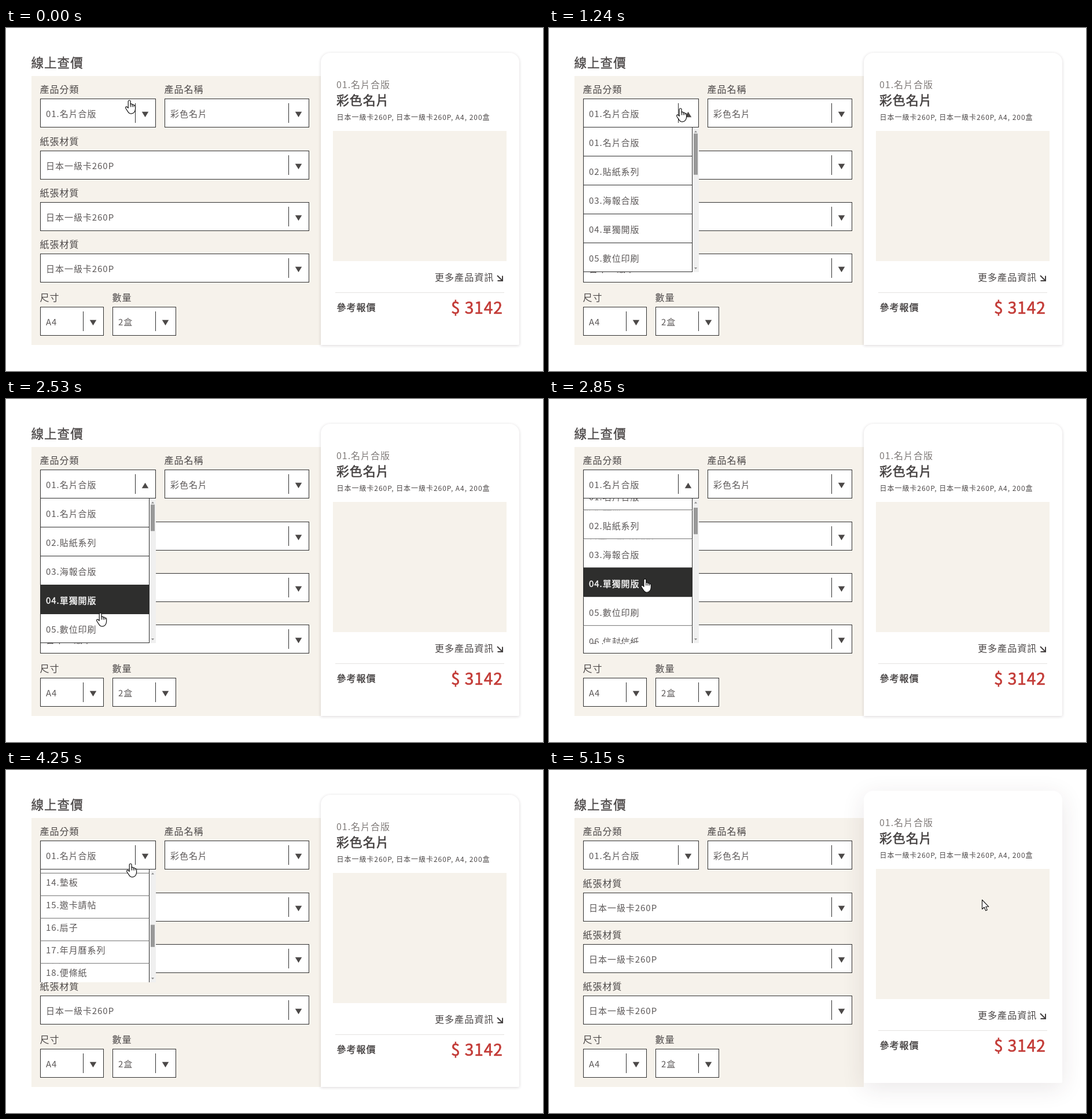
An HTML page with a canvas for the animation above (5.29 s loop, 928x593 px).

```html
<!DOCTYPE html>
<html lang="zh-Hant">
<head>
<meta charset="utf-8">
<title>線上查價</title>
<style>
html, body { margin: 0; width: 100%; height: 100%; overflow: hidden; background: #fff; }
canvas { display: block; }
</style>
</head>
<body>
<canvas id="stage" width="928" height="593"></canvas>
<script>
const ctx = document.getElementById('stage').getContext('2d');
const LOOP = 5290, OPEN = 480, CLOSE = 4160;
const FONT = '"Noto Sans CJK TC", "Noto Sans CJK JP", "Noto Sans CJK", sans-serif';
const INK = '#2f2f2f', TEXT = '#4c4848', SOFT = '#5c5858', BEIGE = '#f6f2eb';
const LIST = { x: 59, y: 172, w: 189, bar: 11, row: 50, max: 250 };

const items = ('名片合版 貼紙系列 海報合版 單獨開版 數位印刷 信封信紙 摺頁傳單 書籍手冊 聯單表單 紙袋提袋 ' +
  '資料夾 卡牌、桌遊 明信片 墊板 邀卡請帖 扇子 年月曆系列 便條紙 紙盒 酷卡 帆布海報 杯墊 吊牌 獎狀 其他')
  .split(' ').map((name, i) => String(i + 1).padStart(2, '0') + '.' + name);

const selects = [
  { x: 59, y: 122, w: 200, text: items[0] },
  { x: 274, y: 122, w: 250, text: '彩色名片' },
  ...[212, 301, 390].map(y => ({ x: 59, y, w: 465, text: '日本一級卡260P' })),
  { x: 59, y: 482, w: 110, text: 'A4' },
  { x: 184, y: 482, w: 110, text: '2盒' }
];

// Pointer stops: time, x, y
const path = [
  [0, 213, 125], [280, 227, 139], [1530, 227, 139], [2060, 164, 312], [2120, 164, 318],
  [2530, 163, 370], [2640, 163, 370], [2900, 166, 305], [3760, 166, 305],
  [4200, 215, 162], [4330, 215, 162], [5130, 748, 224], [LOOP, 748, 224]
];

const clamp = v => Math.min(1, Math.max(0, v));
const ease = v => { v = clamp(v); return v * v * (3 - 2 * v); };
const mix = (a, b, k) => a + (b - a) * k;

function pointer(t) {
  let n = 1;
  while (n < path.length - 1 && t >= path[n][0]) n++;
  const [t0, x0, y0] = path[n - 1], [t1, x1, y1] = path[n];
  const k = ease((t - t0) / (t1 - t0));
  return { x: mix(x0, x1, k), y: mix(y0, y1, k) };
}

function rowHeight(i, t) {
  return LIST.row * (t < CLOSE ? ease((t - 530 - 36 * i) / 300) : 1 - ease((t - CLOSE) / 300));
}

const scrollAt = t => 500 * ease((t - 2780) / 480);

function hoveredRow(t) {
  if (t < 1000 || t >= CLOSE || (t > 2860 && t < 3790)) return -1;
  const p = pointer(t);
  if (p.y < LIST.y || p.x > LIST.x + LIST.w) return -1;
  return Math.floor((p.y - LIST.y + scrollAt(t)) / LIST.row);
}

// Share of the last 160 ms that the pointer spent on a row
function hoverAmount(i, t) {
  let hits = 0;
  for (let k = 0; k < 16; k++) if (hoveredRow(t - k * 10) === i) hits++;
  return hits / 16;
}

function rect(x, y, w, h, color) {
  ctx.fillStyle = color;
  ctx.fillRect(x, y, w, h);
}

// Text centred vertically on y; "heavy" thickens the strokes
function label(str, x, y, size, color = TEXT, heavy = 0, align = 'left') {
  ctx.font = `400 ${size}px ${FONT}`;
  ctx.letterSpacing = '0.96px';
  ctx.textAlign = align;
  ctx.fillStyle = ctx.strokeStyle = color;
  const base = y + size * 0.38;
  ctx.fillText(str, x, base);
  if (heavy) {
    ctx.lineWidth = heavy;
    ctx.lineJoin = 'round';
    ctx.strokeText(str, x, base);
  }
}

function poly(points, x, y, fill, stroke) {
  ctx.beginPath();
  points.forEach(([px, py]) => ctx.lineTo(x + px, y + py));
  ctx.closePath();
  ctx.fillStyle = fill;
  ctx.fill();
  if (stroke) {
    ctx.strokeStyle = stroke;
    ctx.lineWidth = 1.1;
    ctx.lineJoin = 'round';
    ctx.stroke();
  }
}

function triangle(x, y, w, h, up, color) {
  const d = up ? -1 : 1;
  poly([[-w / 2, -d * h / 2], [w / 2, -d * h / 2], [0, d * h / 2]], x, y, color);
}

function drawSelect({ x, y, w, text }, up) {
  rect(x, y, w, 50, INK);
  rect(x + 1, y + 1, w - 2, 48, '#fff');
  rect(x + w - 36, y + 8, 1, 34, INK);
  triangle(x + w - 18.5, y + 27.5, 11.5, 9.5, up, '#4c4948');
  label(text, x + 10, y + 26.5, 15, SOFT);
}

function drawForm(t) {
  label('線上查價', 43.5, 60, 21.6, TEXT, 0.35);
  rect(44, 83, 500, 465, BEIGE);
  label('產品分類', 58.5, 105.5, 16);
  label('產品名稱', 273.5, 105.5, 16);
  for (const y of [195.5, 284.5, 373.5]) label('紙張材質', 58.5, y, 16);
  label('尺寸', 58.5, 466, 16);
  label('數量', 183.5, 466, 16);
  selects.forEach((s, i) => drawSelect(s, i === 0 && t >= OPEN && t < CLOSE));
}

function drawCard(t) {
  const k = ease((t - 4680) / 420);
  ctx.save();
  ctx.translate(0, -7 * k);
  ctx.shadowColor = `rgba(60,40,50,${mix(0.2, 0.11, k)})`;
  ctx.shadowBlur = mix(5, 40, k);
  ctx.shadowOffsetY = mix(1, 9, k);
  ctx.fillStyle = '#fff';
  ctx.beginPath();
  ctx.roundRect(544, 43, 343, 505, [16, 16, 2, 0]);
  ctx.fill();
  ctx.shadowColor = 'transparent';
  label(items[0], 571, 97.5, 16, '#7f7a78');
  label('彩色名片', 571, 125, 21.9, '#444040', 0.6);
  label('日本一級卡260P, 日本一級卡260P, A4, 200盒', 571.5, 154.5, 12, TEXT);
  rect(565, 178, 300, 225, BEIGE);
  label('更多產品資訊', 741, 431, 16.1);
  ctx.strokeStyle = '#454141';
  ctx.lineWidth = 2;
  ctx.lineJoin = 'miter';
  ctx.beginPath();
  ctx.moveTo(849, 428);
  ctx.lineTo(857.5, 436.5);
  ctx.moveTo(858, 428.5);
  ctx.lineTo(858, 437);
  ctx.lineTo(849.5, 437);
  ctx.stroke();
  rect(569, 457, 292, 1, '#e4e2e0');
  label('參考報價', 571.5, 483, 16, '#444040', 0.4);
  label('$ 3142', 769, 483.5, 28, '#c33b37', 0.7);
  ctx.restore();
}

function drawScrollbar(view, total, scroll) {
  const x = LIST.x + LIST.w, mid = x + 5.5, track = view - 21;
  rect(x, LIST.y, LIST.bar, view, '#f0f0f0');
  if (track < 10) return;
  rect(x + 2, LIST.y + 10.5 + track * scroll / total, 7, track * view / total, '#999');
  triangle(mid, LIST.y + 7, 5, 3, true, '#8a8a8a');
  triangle(mid, LIST.y + view - 6.5, 5, 3, false, '#8a8a8a');
}

function drawList(t) {
  const heights = items.map((_, i) => rowHeight(i, t));
  const total = heights.reduce((a, b) => a + b, 0);
  const closing = t >= CLOSE;
  const view = closing ? 5 * heights[0] : Math.min(LIST.max, total);
  if (view < 0.5) return;
  const scroll = Math.min(scrollAt(t), total - view);
  const { x, w } = LIST;

  ctx.save();
  ctx.beginPath();
  ctx.rect(x, LIST.y, w + LIST.bar, view);
  ctx.clip();
  let y = LIST.y - scroll;
  heights.forEach((h, i) => {
    if (h > 0.2 && y + h > LIST.y && y < LIST.y + view) {
      const on = hoverAmount(i, t);
      ctx.save();
      ctx.beginPath();
      ctx.rect(x, y - 1, w, h + 1);
      ctx.clip();
      rect(x, y, w, h, '#fff');
      if (on) rect(x, y - 1, w, h + 1, `rgba(46,46,45,${on})`);
      rect(x, y + h - 1, w, 1, INK);
      rect(x, y, 1, h, INK);
      rect(x + w - 1, y, 1, h, INK);
      label(items[i], x + 10, y + h - 23.5, 15, on > 0.5 ? '#fff' : SOFT, on > 0.5 ? 0.35 : 0);
      ctx.restore();
    }
    y += h;
  });
  if (total > view + 1) {
    // The thumb shrinks a little behind the rows while closing
    const lag = closing ? LIST.row - heights[0] : 0;
    drawScrollbar(view, Math.max(view, total - 8 * lag), Math.max(0, scroll - 6 * lag));
  }
  ctx.restore();
}

const arrowShape = [[0, 0], [0, 16], [3.6, 12.7], [6.2, 18.6], [8.8, 17.4], [6.3, 11.8], [11.4, 11.8]];

function drawHand(x, y) {
  ctx.save();
  ctx.translate(x, y);
  ctx.beginPath();
  ctx.moveTo(-1.8, 13);
  ctx.lineTo(-1.8, 1.8);
  ctx.quadraticCurveTo(-1.6, 0, 0.2, 0);
  ctx.quadraticCurveTo(2, 0, 2.1, 1.8);
  ctx.lineTo(2.1, 6.4);
  ctx.quadraticCurveTo(4.6, 5.6, 5.2, 7.4);
  ctx.quadraticCurveTo(7.4, 6.6, 8, 8.6);
  ctx.quadraticCurveTo(10.6, 8, 10.7, 10.6);
  ctx.lineTo(10.6, 15);
  ctx.quadraticCurveTo(10.4, 18, 8.8, 20.4);
  ctx.quadraticCurveTo(6.5, 23.2, 3.4, 23.2);
  ctx.quadraticCurveTo(-0.4, 23.2, -2.2, 19.8);
  ctx.lineTo(-6, 14);
  ctx.quadraticCurveTo(-7, 11.6, -5.2, 11.2);
  ctx.quadraticCurveTo(-3.8, 10.9, -1.8, 13.4);
  ctx.closePath();
  ctx.fillStyle = '#fff';
  ctx.fill();
  ctx.strokeStyle = '#111';
  ctx.lineWidth = 1.2;
  ctx.lineJoin = 'round';
  ctx.stroke();
  ctx.beginPath();
  for (const [kx, ky] of [[2.1, 6.4], [5.2, 7.4], [8, 8.6]]) {
    ctx.moveTo(kx, ky);
    ctx.lineTo(kx, 11.5);
  }
  ctx.stroke();
  ctx.restore();
}

function drawPointer(t) {
  const { x, y } = pointer(t);
  const overSelect = selects.some(s => x >= s.x && x < s.x + s.w && y >= s.y && y < s.y + 50);
  if (t < 4330 || overSelect) drawHand(x, y);
  else poly(arrowShape, x + 0.5, y + 0.5, '#fff', '#111');
}

function draw(t) {
  rect(0, 0, 928, 593, '#fff');
  drawForm(t);
  drawCard(t);
  drawList(t);
  drawPointer(t);
}

const start = performance.now();
function tick() {
  draw((performance.now() - start) % LOOP);
  requestAnimationFrame(tick);
}
tick();
</script>
</body>
</html>
```
